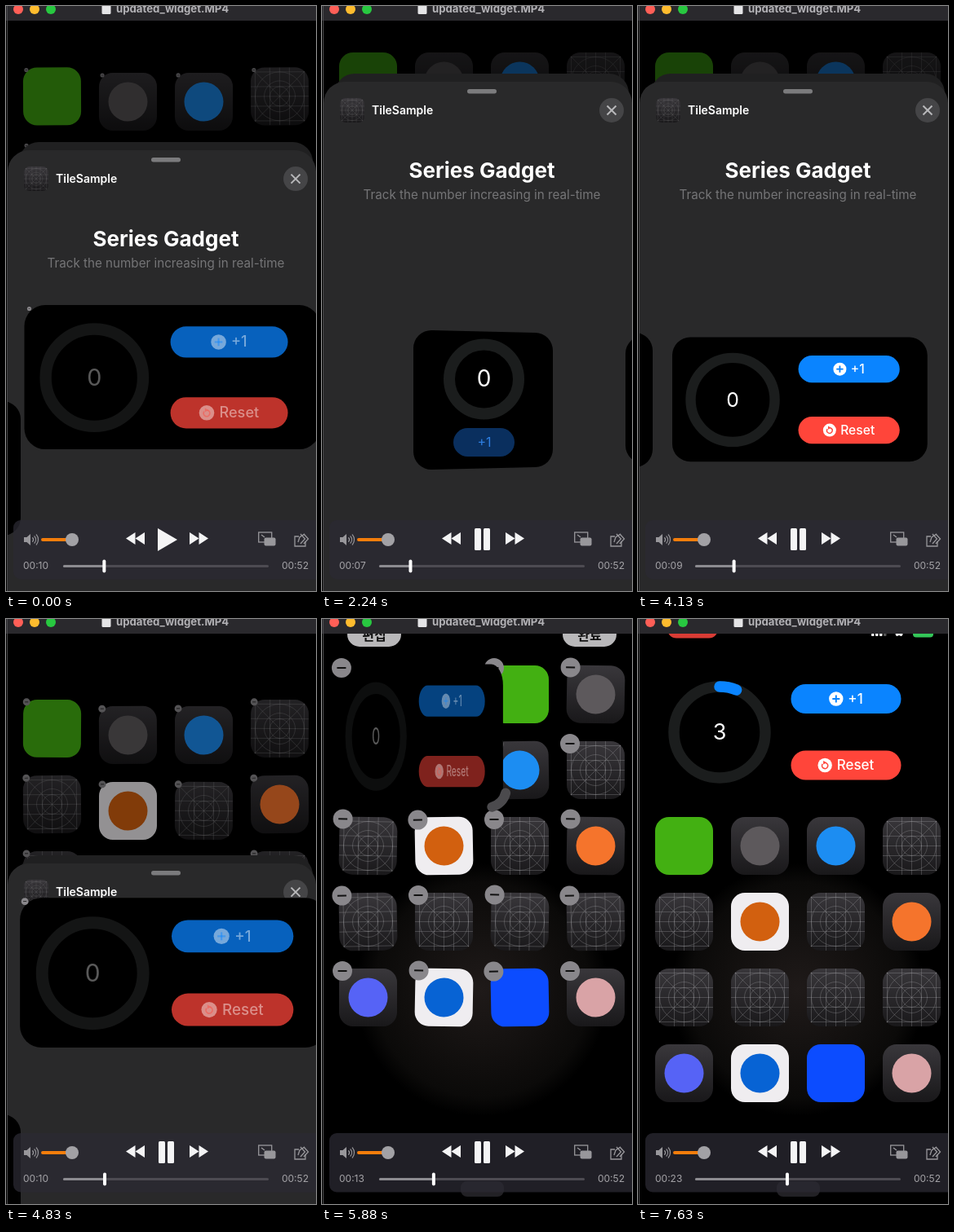
Animation, 380 px wide and 718 px high, one loop 8000 ms. Source, as an HTML page with a canvas:

```html
<!DOCTYPE html>
<html lang="en">
<head>
<meta charset="utf-8">
<title>Widget demo playback</title>
<style>
html, body { margin: 0; width: 100%; height: 100%; overflow: hidden; background: #000; }
canvas { display: block; width: 380px; height: 718px; }
</style>
</head>
<body>
<canvas id="stage" width="380" height="718"></canvas>
<script>
const ctx = document.getElementById('stage').getContext('2d');
const LOOP = 8000, STEP = 70;
const FONT = 'Inter, sans-serif', KOREAN = '"Noto Sans CJK KR", "Noto Sans CJK", sans-serif';
const BLUE = '#0a84ff', RED = '#ff453a', TURN = Math.PI * 2;

const mix = (a, b, k) => a + (b - a) * k;
const clamp = (v, lo = 0, hi = 1) => Math.min(hi, Math.max(lo, v));
const linear = (t, from, to) => clamp((t - from) / (to - from));
const ease = (t, from, to) => {
  const k = linear(t, from, to);
  return k * k * (3 - 2 * k);
};

function box(x, y, w, h, r, fill) {
  ctx.beginPath();
  ctx.roundRect(x, y, w, h, r);
  ctx.fillStyle = fill;
  ctx.fill();
}
function disc(x, y, r, fill) {
  ctx.beginPath();
  ctx.arc(x, y, r, 0, TURN);
  ctx.fillStyle = fill;
  ctx.fill();
}
function ring(x, y, r, width, color, from = 0, to = TURN) {
  ctx.beginPath();
  ctx.arc(x, y, r, from, to);
  ctx.lineWidth = width;
  ctx.strokeStyle = color;
  ctx.lineCap = 'round';
  ctx.stroke();
  ctx.lineCap = 'butt';
}
function line(color, width, ...p) {
  ctx.beginPath();
  for (let i = 0; i < p.length; i += 2) ctx.lineTo(p[i], p[i + 1]);
  ctx.strokeStyle = color;
  ctx.lineWidth = width;
  ctx.stroke();
}
function cross(x, y, r, color, width) {
  line(color, width, x - r, y - r, x + r, y + r);
  line(color, width, x + r, y - r, x - r, y + r);
}
function triangle(x, y, w, h, fill) {
  ctx.beginPath();
  ctx.moveTo(x, y - h / 2);
  ctx.lineTo(x + w, y);
  ctx.lineTo(x, y + h / 2);
  ctx.fillStyle = fill;
  ctx.fill();
}
// Rounded card seen at an angle: lean > 0 makes the left edge taller.
function card(x, y, w, h, r, lean) {
  const corners = [[x, y - lean], [x + w, y + lean], [x + w, y + h - lean], [x, y + h + lean]];
  ctx.beginPath();
  ctx.moveTo(x + w / 2, y);
  for (let i = 1; i <= 4; i++) ctx.arcTo(...corners[i % 4], ...corners[(i + 1) % 4], r);
  ctx.closePath();
  ctx.fillStyle = '#000';
  ctx.fill();
}
function text(str, x, y, size, color, { weight = 400, align = 'left', family = FONT } = {}) {
  ctx.font = `${weight} ${size}px ${family}`;
  ctx.textAlign = align;
  ctx.textBaseline = 'middle';
  ctx.fillStyle = color;
  ctx.fillText(str, x, y);
}
function faded(alpha, draw) {
  ctx.save();
  ctx.globalAlpha *= alpha;
  draw();
  ctx.restore();
}

// Home screen
const SIZE = 71, PITCH = 93, LEFT = 21, TOP = 57;
const GRID = {};
const DARK = 'dark', LIGHT = '#efedf0';
const app = (base, mark) => ({ base, mark });
const ICONS = [
  app('#43b012'), app(DARK, '#5d595c'), app(DARK, '#1c8df2'), GRID,
  GRID, app(LIGHT, '#d2600f'), GRID, app(DARK, '#f5742c'),
  GRID, GRID, GRID, GRID,
  app(DARK, '#5663f6'), app(LIGHT, '#0763d4'), app('#0c4cff'), app(DARK, '#d9a3a6')
];

function darkTile() {
  const g = ctx.createLinearGradient(0, 0, 0, SIZE);
  g.addColorStop(0, '#39373b');
  g.addColorStop(1, '#19181a');
  return g;
}
function gridTile() {
  const c = SIZE / 2, color = 'rgba(170,170,172,.42)';
  box(0, 0, SIZE, SIZE, 17, darkTile());
  ctx.save();
  ctx.clip();
  for (const d of [-30, -12, 0, 12, 30]) {
    line(color, .7, c + d, 0, c + d, SIZE);
    line(color, .7, 0, c + d, SIZE, c + d);
  }
  cross(c, c, c, color, .7);
  for (const r of [12, 19, 30]) ring(c, c, r, .7, color);
  ctx.restore();
}
function tile({ base, mark }) {
  if (!base) return gridTile();
  box(0, 0, SIZE, SIZE, 17, base === DARK ? darkTile() : base);
  if (mark) disc(SIZE / 2, SIZE / 2, 24, mark);
}
function badge(x, y, k) {
  if (k < .05) return;
  disc(x, y, 12 * k, '#89878b');
  box(x - 5.5 * k, y - k, 11 * k, 2 * k, 0, '#111');
}

function slot(i, drop, squeeze) {
  const col = i % 4, row = i >> 2;
  const sway = (col % 3 ? 8 : 0) * Math.sin(Math.PI * Math.sqrt(drop));
  const x = LEFT + PITCH * col, y = TOP + PITCH * (row + 2 * drop) + sway;
  const narrowX = row ? x : LEFT + PITCH * (2 + i % 2);
  const narrowY = TOP + PITCH * (row ? row + 1 : i >> 1);
  return [mix(x, narrowX, squeeze), mix(y, narrowY, squeeze)];
}

function home({ t, edit, squeeze, reveal }) {
  const settled = t > 5300;
  if (settled) {
    const glow = ctx.createRadialGradient(196, 455, 0, 196, 455, 155);
    glow.addColorStop(0, '#1f1a19');
    glow.addColorStop(.85, '#0b0a09');
    glow.addColorStop(1, '#000');
    disc(196, 455, 155, glow);
  }
  ICONS.forEach((icon, i) => {
    const [x, y] = slot(i, reveal ** 1.5, squeeze);
    ctx.save();
    ctx.translate(x + SIZE / 2, y + SIZE / 2);
    ctx.rotate(.022 * edit * Math.sin(t / 36 + i * 2.1));
    ctx.translate(-SIZE / 2, -SIZE / 2);
    tile(icon);
    badge(4, 3, edit);
    ctx.restore();
  });
  ctx.fillStyle = `rgba(0,0,0,${.62 * (1 - reveal)})`;
  ctx.fillRect(0, 0, 380, 718);
  if (!settled) return;
  box(170, 690, 53, 19, 8, '#222125');
  if (t < 6600) {
    editPill('편집', 31);
    editPill('완료', 295);
  } else statusBar();
}
function editPill(label, x) {
  box(x, 4, 66, 30, 15, '#b9b8ba');
  text(label, x + 33, 20, 16, '#111', { weight: 700, align: 'center', family: KOREAN });
}
function statusBar() {
  box(36, 0, 62, 23.5, 11, '#d93c35');
  for (let i = 0; i < 4; i++) box(286 + i * 5, 18 - i, 3.5, 3 + i, 1, i < 3 ? '#fff' : '#555');
  ring(320, 22, 4, 4, '#fff', -2.2, -.9);
  box(337, 10, 25, 12.5, 4, '#34c759');
}

// Widgets
function smallWidget(t, sheet, page) {
  ctx.save();
  ctx.translate(-265 * page, sheet);
  card(112, 306.5, 171, 168, 22, 2);
  faded(mix(.42, 1, ease(t, 1750, 2100)), () => {
    ring(198.5, 365, 42.5, 14, '#1b1d1d');
    text('0', 198.5, 366, 28, '#fff', { align: 'center' });
    box(161, 425, 75, 35, 17.5, '#0a2f5e');
    text('+1', 199, 443, 16, '#2e7fe2', { align: 'center' });
  });
  ctx.restore();
}

function button(y, label, color, dim) {
  faded(1 - .26 * dim, () => box(172, y - 18, 135, 36, 18, color));
  faded(1 - .55 * dim, () => {
    ctx.font = `500 17px ${FONT}`;
    const left = 239.5 - (ctx.measureText(label).width + 23) / 2, x = left + 8.5;
    disc(x, y, 8.7, '#fff');
    if (label === '+1') {
      line(color, 2, x - 4.5, y, x + 4.5, y);
      line(color, 2, x, y - 4.5, x, y + 4.5);
    } else {
      ring(x, y + .5, 3.6, 1.6, color, -1.2, 3.6);
      triangle(x - 2, y - 3.2, 4, 4.5, color);
    }
    text(label, left + 23, y + .5, 17, '#fff', { weight: 500 });
  });
}

function mediumWidget({ t, page, edit, squeeze }) {
  const lift = ease(t, 4270, 4880), fly = ease(t, 4830, 5390);
  const x = mix(mix(38.3, 12.2, lift), 15.5, fly) + 330 * (1 - page);
  const y = mix(mix(404.7, 337.6, lift * lift), 53.5, fly);
  const scale = mix(mix(.92, 1.11, lift), 1, fly);
  const sx = scale * (1 - .4 * squeeze), sy = scale * (1 + .06 * squeeze);
  const dim = ease(t, 4270, 4650) - ease(t, 5740, 6090);
  const count = t < 6900 ? 0 : t < 7420 ? 1 : t < 7490 ? 2 : 3;
  const right = x + 344 * sx, bottom = y + 168 * sy;
  ctx.save();
  ctx.translate(x, y);
  ctx.scale(sx, sy);
  card(4, 2, 340, 166, 24, 2.5 * (1 - ease(t, 3100, 4200)));
  faded(1 - .4 * squeeze, () => {
    faded(1 - .25 * dim, () => ring(84.5, 85.5, 56, 13.5, '#1b1d1d'));
    if (count) ring(84.5, 85.5, 56, 13.5, BLUE, -TURN / 4, TURN * (count / 50 - 1 / 4));
    faded(1 - .65 * dim, () => text(count, 84.5, 86.5, 27, '#fff', { align: 'center' }));
    button(44.5, '+1', BLUE, dim);
    button(126, 'Reset', RED, dim);
  });
  ctx.restore();
  if (squeeze > .3) ring(right - 20, bottom - 24, 24, 12, '#4b4a4d', .25, 1.3);
  badge(x + 4 * sx + 6, y + 6.5, edit);
}

// Widget picker
function searchSheet(top) {
  box(16, top, 360, 720, 24, '#202021');
  if (top > 83) return;
  box(40, 107, 274, 40, 11, '#2e2e30');
  ring(63, 127, 5.5, 1.5, '#9a9a9d');
  line('#9a9a9d', 1.5, 67, 131, 71, 135);
  text('Wid', 81, 129, 16.5, '#a9a9ab');
  disc(290.5, 128, 8, '#8f8f92');
  cross(290.5, 128, 3, '#2e2e30', 1.5);
  text('취소', 324, 127, 14.5, '#737376', { family: KOREAN });
}

function picker({ t, sheet, page }) {
  searchSheet(Math.max(83, sheet - 10));
  box(2, sheet, 378, 760, 26, '#29292a');
  box(178, sheet + 9, 36, 5.5, 3, '#7b7b7d');
  ctx.save();
  ctx.translate(22, sheet + 20);
  ctx.scale(30 / SIZE, 30 / SIZE);
  gridTile();
  ctx.restore();
  text('TileSample', 61, sheet + 35.5, 14, '#fff', { weight: 600 });
  disc(355, sheet + 35, 15, '#454547');
  cross(355, sheet + 35, 5.5, '#b9b9bb', 2);
  text('Series Gadget', 196, sheet + 110, 26, '#fff', { weight: 700, align: 'center' });
  text('Track the number increasing in real-time', 196, sheet + 139, 15.2, '#757577', { align: 'center' });
  smallWidget(t, sheet, page);
}

// Player window
function titleBar() {
  box(0, 0, 380, 18, 0, '#2a292d');
  ['#ff5f57', '#febc2e', '#28c840'].forEach((color, i) => disc(15 + 20 * i, 4, 6, color));
  box(117.5, -3, 11, 13, 1.5, '#e4e4e6');
  text('updated_widget.MP4', 135, 4, 13.2, '#b2b1b5', { weight: 700 });
  box(1, 0, 1, 718, 0, '#4a4a4c');
}

function controls(seconds, playing) {
  const gray = '#98979b', white = '#f4f4f5';
  box(9, 631, 380, 72.5, 9, 'rgba(43,41,51,.76)');
  box(22, 652, 4, 6, 0, gray);
  triangle(30, 655, -8, 14, gray);
  for (const r of [3.5, 6.5, 9.5]) ring(30, 655, r, 1.2, gray, -.7, .7);
  box(43, 653, 36, 4, 2, '#f57d0b');
  disc(81, 655, 8, '#a2a1a5');
  for (const dx of [0, 11.5]) {
    triangle(158.5 + dx, 653.5, -11.5, 15, white);
    triangle(225 + dx, 653.5, 11.5, 15, white);
  }
  if (playing) for (const x of [187, 198]) box(x, 641, 8, 27, 1.5, white);
  else triangle(186, 655, 24, 28, white);
  ctx.strokeStyle = gray;
  ctx.lineWidth = 1.3;
  ctx.strokeRect(309.7, 646, 16, 12);
  box(316.5, 652.5, 14, 10, 2, gray);
  line(gray, 1.3, 313, 649, 317, 652);
  line(gray, 1.3, 359, 651, 354, 651, 354, 663, 367, 663, 367, 657);
  line(gray, 1.3, 358, 658, 360, 652, 366, 648);
  for (const x of [361, 365]) line(gray, 1.3, x, 648, x + 5.5, 654, x, 660);

  const x = 70 + seconds / 52 * 252;
  text('00:' + String(Math.floor(seconds)).padStart(2, '0'), 21, 687, 12, '#a5a4a8');
  text('00:52', 371, 687, 12, '#a5a4a8', { align: 'right' });
  box(70, 686, 252, 3, 1.5, '#4d4b52');
  box(70, 686, x - 70, 3, 1.5, '#8c8b90');
  box(x - 2, 679.5, 4, 16, 2, '#fff');
}

const RUNS = [
  { from: 1750, to: 5040, second: 7.45 },
  { from: 5390, to: 5740, second: 13.3 },
  { from: 5880, to: 6090, second: 13.8 },
  { from: 6440, to: 7000, second: 18.4 },
  { from: 7420, to: 7630, second: 23.1 }
];

// Before the first run the user scrubs back in two bursts of equal jumps.
function playhead(t) {
  const run = RUNS.findLast(r => t >= r.from) || RUNS[0];
  const jumps = clamp(Math.floor(t / STEP) - 3, 0, 3) + clamp(Math.floor(t / STEP) - 8, 0, 2);
  const pose = t < run.from ? mix(4690, run.from, jumps / 5) : Math.min(t, run.to);
  return [pose, run.second + (pose - run.from) / 1000];
}

function draw(time) {
  const [t, seconds] = playhead(time);
  const reveal = linear(t, 4500, 5390);
  const fall = Math.max(0, t - 4444);
  const scene = {
    t, reveal,
    edit: reveal * (1 - ease(t, 6440, 6650)),
    squeeze: ease(t, 5390, 5850) - ease(t, 5880, 6090),
    page: ease(t, 2330, 2900),
    sheet: 93 + 42 * (1 - linear(t, 1750, 2150)) ** 2 + .00139 * fall * fall
  };
  ctx.fillStyle = '#000';
  ctx.fillRect(0, 0, 380, 718);
  home(scene);
  if (scene.sheet < 728) picker(scene);
  mediumWidget(scene);
  titleBar();
  controls(seconds, time >= 1330);
}

const start = performance.now();
function tick() {
  const t = (performance.now() - start) % LOOP;
  draw(Math.floor(t / STEP) * STEP);
  requestAnimationFrame(tick);
}
tick();
</script>
</body>
</html>
```
